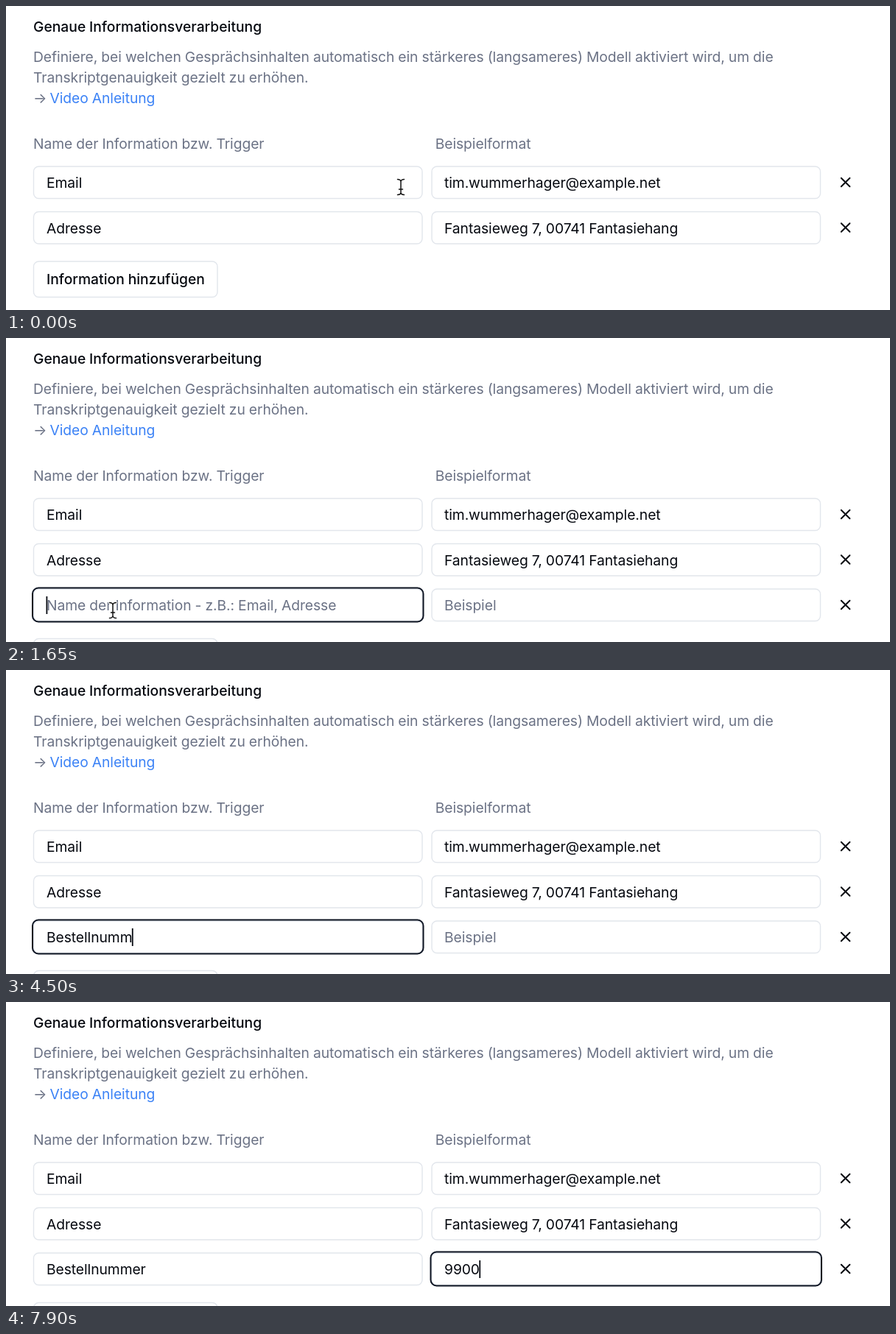
These frames come from a looping animation (1200 by 413 pixels, 8 s). An HTML page:

```html
<!DOCTYPE html>
<html lang="de">
<head>
<meta charset="utf-8">
<title>Formular</title>
<style>
html, body { margin: 0; width: 100%; height: 100%; overflow: hidden; background: #fff; }
svg { display: block; }
text { font: 400 19.3px Inter, "Liberation Sans", sans-serif; letter-spacing: -0.004em; word-spacing: -0.25px; fill: #05080f; white-space: pre; }
.strong { font-weight: 500; letter-spacing: 0; }
.muted { fill: #6b7285; }
.link { fill: #3b82f6; }
.bad { fill: #e0393e; }
.note { font-size: 16.6px; font-weight: 500; }
.box { fill: #fff; stroke: #e2e6ec; stroke-width: 1.4; }
.ring { fill: none; stroke: #0b1220; stroke-width: 2; }
.cross { fill: none; stroke: #05080f; stroke-width: 2; stroke-linecap: round; }
</style>
</head>
<body>
<svg id="stage" width="1200" height="413" viewBox="0 0 1200 413">
  <defs>
    <path id="x" class="cross" d="M-5.8-5.8 5.8 5.8M5.8-5.8-5.8 5.8"/>
    <path id="ibeam" d="M-4.5-10.5Q-.5-10.5 0-7.5Q.5-10.5 4.5-10.5M0-7.5V7.5M-4.5 10.5Q-.5 10.5 0 7.5Q.5 10.5 4.5 10.5M-2.5 3H2.5"/>
  </defs>
  <text id="title" class="strong" x="37" y="35">Genaue Informationsverarbeitung</text>
  <text class="muted" x="37" y="76">Definiere, bei welchen Gesprächsinhalten automatisch ein stärkeres (langsameres) Modell aktiviert wird, um die</text>
  <text class="muted" x="37" y="104">Transkriptgenauigkeit gezielt zu erhöhen.</text>
  <text class="muted" x="37" y="132">→</text>
  <text class="link" x="59.5" y="132">Video Anleitung</text>
  <text class="muted" x="37" y="193.5">Name der Information bzw. Trigger</text>
  <text class="muted" x="582.7" y="193.5">Beispielformat</text>

  <rect class="box" x="37.5" y="218" width="527.5" height="43.5" rx="7"/>
  <rect class="box" x="578" y="218" width="527.5" height="43.5" rx="7"/>
  <text x="55" y="247">Email</text>
  <text x="595" y="247">tim.wummerhager@example.net</text>
  <use href="#x" x="1139.6" y="239.5"/>

  <rect class="box" x="37.5" y="279.5" width="527.5" height="43.5" rx="7"/>
  <rect class="box" x="578" y="279.5" width="527.5" height="43.5" rx="7"/>
  <text x="55" y="308.5">Adresse</text>
  <text x="595" y="308.5">Fantasieweg 7, 00741 Fantasiehang</text>
  <use href="#x" x="1139.6" y="301"/>

  <g id="button">
    <rect id="face" class="box" x="37.5" y="347" width="249.5" height="48.5" rx="7"/>
    <text class="strong" x="55" y="378">Information hinzufügen</text>
  </g>

  <g id="row">
    <rect id="nameBox" class="box" x="37.5" y="341" width="527.5" height="43.5" rx="7"/>
    <rect class="box" x="578" y="341" width="527.5" height="43.5" rx="7"/>
    <rect id="ring" class="ring" y="339.5" width="530.5" height="46" rx="8"/>
    <text id="name" x="55" y="370"></text>
    <text id="sample" x="595" y="370"></text>
    <rect id="caret" y="351" width="1.8" height="24" fill="#05080f"/>
    <use id="remove" href="#x" x="1139.6"/>
    <text id="error" class="bad note" x="37" y="408">Name ist ein Pflichtfeld.</text>
  </g>

  <g id="tip">
    <rect x="175" y="397.5" width="257" height="30" fill="#fff"/>
    <path d="M432.5 402V413" stroke="#e6e6e6"/>
  </g>

  <circle id="pulse" cx="145.3" cy="370" r="27.2" fill="#8ab4f8" fill-opacity=".08" stroke="#78a8f5" stroke-width="4"/>

  <g id="beam" fill="none" stroke-linecap="round">
    <use href="#ibeam" stroke="#fff" stroke-width="3.4"/>
    <use href="#ibeam" stroke="#111" stroke-width="1.5"/>
  </g>
  <path id="arrow" d="M0 0V19L4.4 15 7.4 22 10.6 20.6 7.7 13.8H13.6Z" fill="#111" stroke="#fff" stroke-width="1.5"/>
  <g id="hand" stroke="#111" stroke-width="1.5" stroke-linejoin="round" stroke-linecap="round">
    <path d="M-2.6 1.4C-3.2-1.4 .4-2.2 1.2.6L3 7.4C3.6 5.6 6.2 6 6.6 8C7.4 6.6 9.6 7.2 9.8 9.2C11 8.2 13 9.2 13 11.4V15.4C13 18 11.2 19 11 22.6H1.2C.6 19.6-3.2 16.6-5.6 13.2C-7.6 10.6-4.8 8.8-2.8 10.6L-.6 12.6Z" fill="#fff"/>
    <path d="M3.2 14.2V19M6 14.2V19M8.8 14.2V19" fill="none" stroke-width="1.2"/>
  </g>
</svg>
<script>
const LOOP = 8000, STEP = 50;
const ADDED = 1450, INVALID = 1950, CLICK = 2200, VALID = 2850, TAB = 4950;
const nameKeys = [2800, 3250, 3500, 3600, 3700, 3800, 3900, 4000, 4200, 4400, 4500, 4600, 4700];
const sampleKeys = [6850, 7150, 7700, 7850];
const el = {};
document.querySelectorAll('[id]').forEach(n => el[n.id] = n);

const clamp = v => Math.max(0, Math.min(1, v));
const ramp = (t, a, b) => clamp((t - a) / (b - a));
const show = (node, on) => node.style.display = on ? '' : 'none';
const typed = (word, keys, t) => word.slice(0, keys.filter(k => k <= t).length);

function field(node, value, hint) {
  node.textContent = value || hint;
  node.setAttribute('class', value ? '' : 'muted');
}

function drawPointer(t, added) {
  const p = ramp(t, 0, 850), e = p * p * (3 - 2 * p);
  const x = 536 - 391 * e, y = 246 + 124 * e;
  const onButton = !added && y > 347 && x < 287;
  const onField = added || y < 261.5 || (y > 279.5 && y < 323);
  const kind = onButton ? 'hand' : onField ? 'beam' : 'arrow';
  for (const k of ['hand', 'beam', 'arrow']) {
    show(el[k], k === kind && t < nameKeys[0]);
    el[k].setAttribute('transform', `translate(${x} ${y})`);
  }
  el.face.style.fill = onButton ? '#f1f5f9' : '#fff';
}

function drawCaret(t, value, left, node) {
  const resets = [ADDED, CLICK, ...nameKeys, TAB + 50, ...sampleKeys].filter(k => k <= t);
  const since = t - resets[resets.length - 1];
  show(el.caret, since % 1000 < 500);
  el.caret.setAttribute('x', left + (value ? node.getComputedTextLength() - .6 : -.5));
}

function render(t) {
  const added = t >= ADDED, bad = t >= INVALID && t < VALID, second = t >= TAB;
  el.title.setAttribute('class', bad ? 'strong bad' : 'strong');
  drawPointer(t, added);
  el.button.setAttribute('transform', `translate(0 ${bad ? 90 : added ? 61.5 : 0})`);
  show(el.row, added);

  const name = typed('Bestellnummer', nameKeys, t), sample = typed('9900', sampleKeys, t);
  field(el.name, name, 'Name der Information - z.B.: Email, Adresse');
  field(el.sample, sample, 'Beispiel');
  el.nameBox.style.stroke = bad ? '#e0393e' : '';
  el.nameBox.style.strokeWidth = bad ? 2 : '';
  el.ring.setAttribute('x', second ? 576.5 : 36);
  el.remove.setAttribute('y', bad ? 376.5 : 362.5);
  show(el.error, bad);
  if (added) second ? drawCaret(t, sample, 595, el.sample) : drawCaret(t, name, 55, el.name);

  show(el.tip, t >= 2350 && t < VALID);
  const first = ramp(t, 1150, 1250) * (1 - ramp(t, 1350, 1650));
  const again = ramp(t, 2100, 2200) * (1 - ramp(t, 2250, 2480));
  el.pulse.style.opacity = .7 * Math.max(first, again);
}

function frame() {
  render(Math.floor(performance.now() % LOOP / STEP) * STEP);
  requestAnimationFrame(frame);
}
render(0);
requestAnimationFrame(frame);
</script>
</body>
</html>
```
